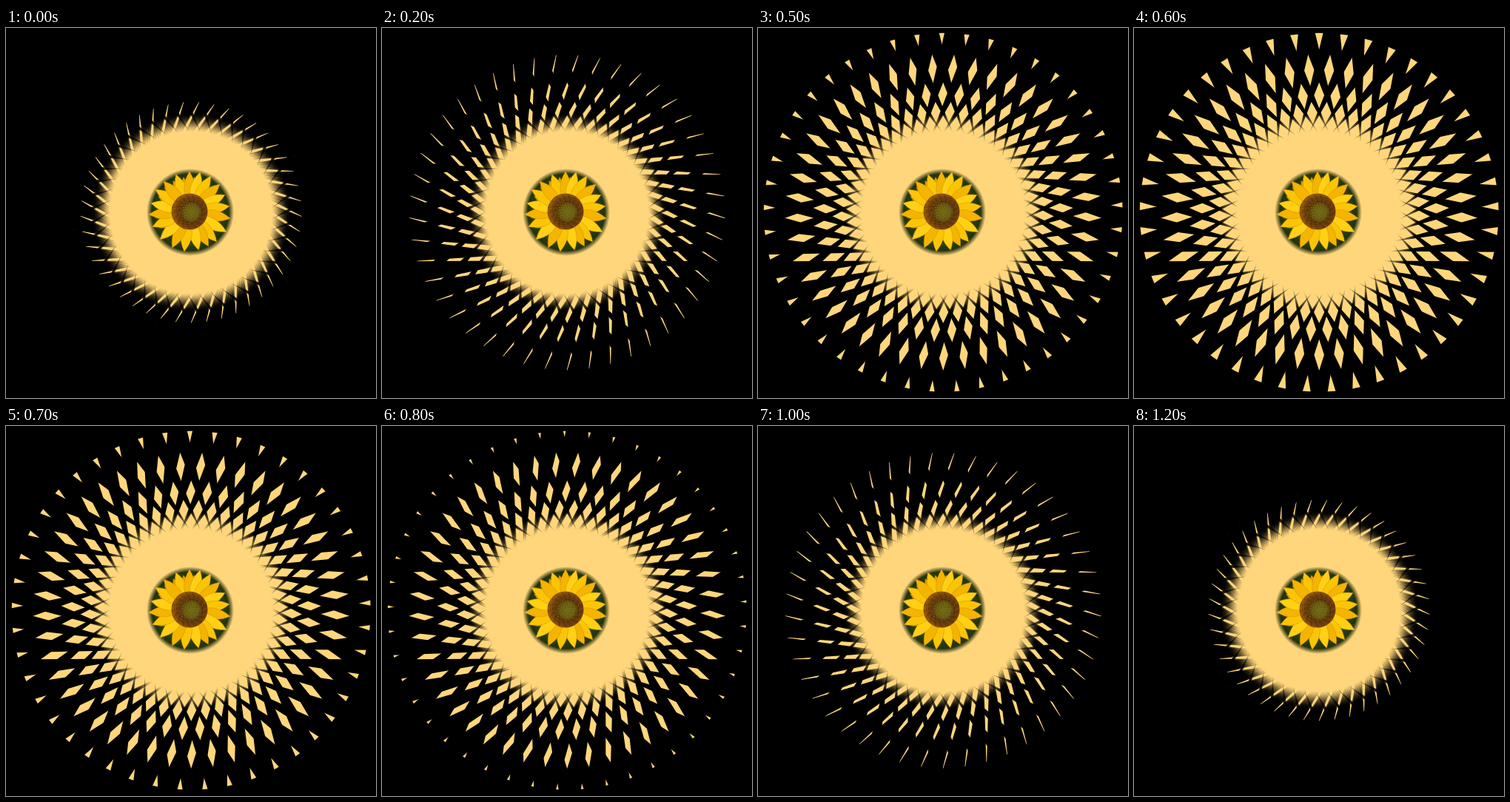
Write an HTML page that moves like this. It is 500x500 px and loops after 1.3 s.

```html
<!DOCTYPE html>
<html lang="en">
<head>
<meta charset="utf-8">
<title>Sunflower burst</title>
<style>
  html, body { margin: 0; width: 100%; height: 100%; overflow: hidden; background: #000; }
  svg { display: block; width: 100vw; height: 100vh; }
</style>
</head>
<body>
<svg viewBox="0 0 500 500">
  <defs>
    <radialGradient id="ink" gradientUnits="userSpaceOnUse" cx="0" cy="0" r="136">
      <stop offset=".79" stop-opacity=".1"/>
      <stop offset="1"/>
    </radialGradient>
    <path id="rays" fill="url(#ink)"/>
    <radialGradient id="fade" gradientUnits="userSpaceOnUse" cx="249" cy="249" r="59">
      <stop offset=".88" stop-color="#fff"/>
      <stop offset="1" stop-color="#fff" stop-opacity="0"/>
    </radialGradient>
    <mask id="vignette" maskUnits="userSpaceOnUse" x="180" y="180" width="140" height="140">
      <circle cx="249" cy="249" r="59" fill="url(#fade)"/>
    </mask>
    <radialGradient id="leaves">
      <stop offset=".7" stop-color="#2c420e"/>
      <stop offset="1" stop-color="#1c280a"/>
    </radialGradient>
    <radialGradient id="seeds" cx=".56" cy=".52">
      <stop offset="0" stop-color="#6d6a16"/>
      <stop offset=".4" stop-color="#67590f"/>
      <stop offset=".58" stop-color="#5a350b"/>
      <stop offset=".85" stop-color="#70400c"/>
      <stop offset="1" stop-color="#8e5808"/>
    </radialGradient>
  </defs>
  <rect width="500" height="500"/>
  <g transform="translate(250.2 249.2)">
    <circle r="242.5" fill="#ffd67b"/>
    <use href="#rays" transform="scale(-1 1)"/>
    <g id="sweep"></g>
  </g>
  <g mask="url(#vignette)">
    <circle cx="249" cy="249" r="59" fill="url(#leaves)"/>
    <g id="flower" transform="translate(248 248)"></g>
  </g>
</svg>
<script>
  const STEP_MS = 100, LOOP_MS = 1300, LAST = 6;
  const RAY_COUNT = 45, PITCH = 360 / RAY_COUNT;
  const TIP_RADIUS = 109, OFFSET = 58.5, CROSS_RADIUS = 193, RAY_LENGTH = 168;
  const SWEEP_STEP = 0.85;

  const rad = degrees => degrees * Math.PI / 180;
  const polar = (r, a) => [r * Math.sin(a), -r * Math.cos(a)];
  const fmt = point => point.map(v => v.toFixed(2)).join(' ');

  function add(parent, tag, attributes) {
    const node = document.createElementNS('http://www.w3.org/2000/svg', tag);
    for (const name in attributes) node.setAttribute(name, attributes[name]);
    return parent.appendChild(node);
  }

  // Slanted black wedges: adjacent ones leave parallel-sided yellow bars.
  function raysPath() {
    const start = Math.acos(OFFSET / TIP_RADIUS) - Math.acos(OFFSET / CROSS_RADIUS);
    const slant = Math.asin(OFFSET / TIP_RADIUS);
    let d = '';
    for (let i = 0; i < RAY_COUNT; i++) {
      const angle = start + rad(i * PITCH);
      const tip = polar(TIP_RADIUS, angle);
      const corner = side => {
        const [dx, dy] = polar(RAY_LENGTH, angle + slant + side * rad(PITCH / 2));
        return [tip[0] + dx, tip[1] + dy];
      };
      d += `M${fmt(tip)}L${fmt(corner(-1))}L${fmt(corner(1))}Z`;
    }
    return d;
  }

  function drawFlower() {
    const flower = document.getElementById('flower');
    const petal = (angle, length, width, fill) => add(flower, 'path', {
      d: `M-4 -18C${-width} -28 ${-width} ${14 - length} 0 ${-length}C${width} ${14 - length} ${width} -28 4 -18Z`,
      transform: `rotate(${angle})`, fill, stroke: '#c98600', 'stroke-width': 0.4
    });
    const tips = [[-18, -49], [0, -53], [14, -52], [28, -47], [40, -36], [47, -22], [53, -7],
      [54, 9], [49, 27], [36, 40], [25, 46], [12, 51], [-7, 53], [-23, 48], [-39, 37],
      [-49, 20], [-54, 4], [-51, -11], [-45, -29], [-34, -40]];
    const shades = ['#fbc507', '#f4b402', '#ffd014'];
    for (let i = 0; i < 20; i++) petal(i * 18 + 8, 47, 8, '#e5a102');
    tips.forEach(([x, y], i) =>
      petal(Math.atan2(x, -y) * 180 / Math.PI, Math.hypot(x, y) + 1, 9, shades[i % 3]));
    add(flower, 'circle', { r: 24.5, fill: 'url(#seeds)' });
    for (let i = 0; i < 170; i++) {
      const [cx, cy] = polar(1.85 * Math.sqrt(i), i * 2.39996);
      add(flower, 'circle', { cx, cy, r: 0.6, fill: i < 55 ? '#8a8320' : i % 2 ? '#3d2108' : '#945a12' });
    }
  }

  document.getElementById('rays').setAttribute('d', raysPath());
  const sweep = document.getElementById('sweep');
  const layers = Array.from({ length: LAST + 1 }, (_, i) =>
    add(sweep, 'use', { href: '#rays', transform: `rotate(${-i * SWEEP_STEP})` }));
  drawFlower();

  function render(now) {
    const step = Math.floor(now % LOOP_MS / STEP_MS);
    const hidden = step <= LAST ? step : 2 * LAST - step;
    layers.forEach((layer, i) =>
      layer.setAttribute('visibility', i <= LAST - hidden ? 'visible' : 'hidden'));
  }

  function tick() {
    render(performance.now());
    requestAnimationFrame(tick);
  }
  tick();
</script>
</body>
</html>
```
